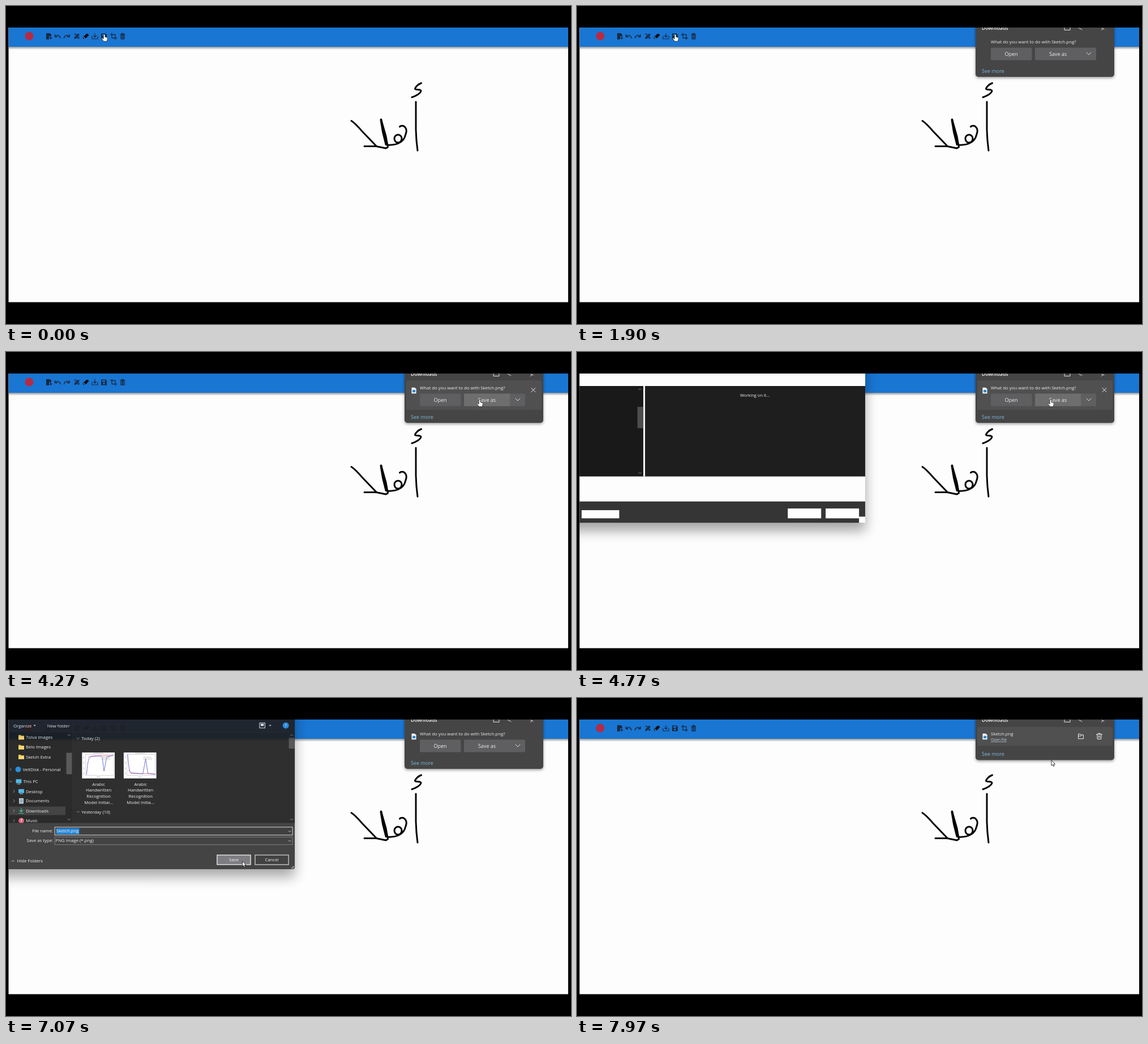
These frames come from a looping animation (998 px wide and 561 px high, 8 s). An HTML page:

```html
<!DOCTYPE html>
<html lang="en">
<head>
<meta charset="utf-8">
<title>Saving a sketch</title>
<style>
html, body { margin: 0; width: 100%; height: 100%; overflow: hidden; background: #000; }
svg { display: block; width: 100%; height: 100%; font-family: "Open Sans", "Noto Sans", sans-serif; }
.line { fill: none; stroke-linecap: round; stroke-linejoin: round; }
</style>
</head>
<body>
<svg id="stage" viewBox="0 0 998 561"></svg>
<script>
const LOOP = 8000;
const stage = document.getElementById("stage");

// Markup helpers
const rect = (x, y, w, h, fill, more = "") => `<rect x="${x}" y="${y}" width="${w}" height="${h}" fill="${fill}" ${more}/>`;
const line = (d, color, width = 1, more = "") => `<path class="line" d="${d}" stroke="${color}" stroke-width="${width}" ${more}/>`;
const label = (x, y, str, size = 7.8, fill = "#eee", more = "") => `<text x="${x}" y="${y}" font-size="${size}" fill="${fill}" ${more}>${str}</text>`;
const centred = (x, y, str, size = 7.8, fill = "#eee") => label(x, y, str, size, fill, 'text-anchor="middle"');
const group = (id, body, more = "") => `<g id="${id}" ${more}>${body}</g>`;
const at = (x, y, body) => `<g transform="translate(${x} ${y})">${body}</g>`;
const chevron = (x, y, dir, color = "#999", s = 2.2) => at(x, y,
  line({ right: `M${-s / 2} ${-s}L${s / 2} 0L${-s / 2} ${s}`,
         down: `M${-s} ${-s / 2}L0 ${s / 2}L${s} ${-s / 2}`,
         up: `M${-s} ${s / 2}L0 ${-s / 2}L${s} ${s / 2}` }[dir], color, 0.9));

function toolbar() {
  const ink = "#182a44";
  const icons = [
    [76, `<path d="M-5-5.5H1.5L4-3V0H0V5.5H-5Z" fill="${ink}"/>` + line("M1 3H5M3 1V5", ink, 1.3)],
    [91, line("M-4.5-3V1H-.5M-4 .5C-1-3.5 4-2 5 3", ink, 1.5)],
    [107.5, line("M4.5-3V1H.5M4 .5C1-3.5-4-2-5 3", ink, 1.5)],
    [125, line("M-4 4L4-4M-4 4L-3.5 1.5L2-4L4-2L-1.5 3.5ZM-4-3L-2.5-4.5L0-2M2 0L4.5 2.5L3 4L.5 1.5", ink, 1.1)],
    [141, `<path d="M-5.5 2L1-4.5H3.5L5.5-2L-1 4.5H-4Z" fill="#0a0d14"/>` + line("M-3.5 1.7L-1.5 3.7", "#5b9be0", 1.5)],
    [157, line("M0-5V1.5M-2.5-1L0 1.5L2.5-1M-5 0V4.5H5V0", ink, 1.2)],
    [173, `<path d="M-5-5H3L5-3V5H-5Z" fill="${ink}"/>` + rect(-3.2, -3.6, 5.6, 2.6, "#1976d2") + '<circle cy="2" r="1.7" fill="#1976d2"/>'],
    [190, line("M-3-5.5V3H5.5M-5.5-3H3V5.5", ink, 1.3)],
    [206, line("M-4-3.5H4M-1.3-5H1.3", ink, 1.4) + line("M-3-1.5V4.5H3V-1.5ZM-1 .3L1 2.7M1 .3L-1 2.7", ink, 1.3)]
  ];
  return rect(4.5, 72, 988.5, 5, "url(#barShade)") + rect(4.5, 38, 988.5, 34, "#1976d2") +
    '<circle cx="41" cy="53" r="7.5" fill="#b52b45"/>' +
    icons.map(([x, body]) => at(x, 53.5, body)).join("");
}

const sketch = () => line(
  "M733.5 136C728 138 723 143 722.5 146C723 149 733 146 733 150C732 154 724 159 717 161" +
  "M724 169L724 218L725 237L727 255" +
  "M610 202.5C617 207 623 214 629 221L654 247" +
  "M633 247.5L654 247.5L671 251L674.5 249L671 230L662.5 200" +
  "M674 245C689 246 700 241 704 232C707 224 709 218 705 214C702 210 697 211 695.5 213" +
  "M686 234A6.5 7 0 1 0 699 234A6.5 7 0 1 0 686 234", "#050505", 3) +
  line("M662.5 201L666 222L671.5 244", "#050505", 4);

function fileIcon() {
  return at(720.5, 68, '<path d="M-4-5.3H1.5L4-2.8V5.3H-4Z" fill="#f4f7fa"/>' + rect(-2.4, -1.2, 5, 4.4, "#2585d0", 'rx="1"'));
}

function popup() {
  const shell = h => rect(704, 10, 245, h - 10, "#454545", 'rx="5" filter="url(#soft)"') +
    label(715, 41.5, "Downloads", 8.7, "#f2f2f2", 'font-weight="600"') +
    line("M861 36V42.5H871V36M886 37.5A3 3 0 0 0 890 40L892 42M927 39L931 41M926.5 42.5L929 40.2", "#e2e2e2");
  const link = y => label(715, y, "See more", 9, "#7db9d8");
  return group("ask",
    shell(125) +
    group("row", rect(707, 50, 239, 52, "#505050", 'rx="3"')) +
    label(731, 65.7, "What do you want to do with Sketch.png?", 7.85) +
    rect(731, 73.5, 72.5, 22, "#5f5f61", 'rx="1.5"') + centred(767, 87.8, "Open", 9) +
    rect(809, 73.5, 108, 22, "#5f5f61", 'rx="1.5"') +
    group("lit", rect(809, 73.5, 81, 22, "#6e6e6e")) +
    centred(849.5, 87.8, "Save as", 9) + chevron(904, 84, "down", "#eee", 4) +
    group("icon", fileIcon()) +
    group("cross", line("M928 63.5L935 70.5M935 63.5L928 70.5", "#eee")) +
    link(117.8)) +
    group("done",
      shell(109.5) +
      group("doneRow", rect(707, 51, 239, 33.5, "#505050", 'rx="3"') +
        line("M885.5 71.5V63.5H889L890 65H894.5V71.5ZM885.5 67H890L891.5 65.5", "#eee") +
        line("M917.5 64H927.5M921 64V62.3H924V64M918.7 64L919.3 72.5H925.7L926.3 64M921.3 66.5V70M923.7 66.5V70", "#eee")) +
      fileIcon() + label(731, 65.8, "Sketch.png", 7.75) +
      label(731, 76.3, "Open file", 6.6, "#b5d3e5", 'text-decoration="underline"') +
      link(102.2));
}

function chart(x, blue, red) {
  return at(x, 96, rect(0, 0, 58, 46, "#fff") +
    rect(6, 3.5, 50, 37, "none", 'stroke="#aaa" stroke-width=".5"') +
    line(red, "#e8697a", 0.9) + line(blue, "#5656c8", 0.9) +
    line("M20 1.5H38M26 43.5H32M3 7V10M3 17V20M3 27V30M3 36V39", "#999", 0.7) +
    line("M35 8.5H49M35 11.5H50", "#aaa", 0.8));
}

function sidebar() {
  const folder = (x, y) => at(x, y, '<path d="M-5-4H-1L0-2.8H5V4H-5Z" fill="#e9b638"/>' + rect(-5, -1.8, 10, 5.8, "#ffd668", 'rx=".6"'));
  const monitor = (x, y) => at(x, y, rect(-5, -4, 10, 7, "#42b4e6", 'rx=".7"') + line("M-2.5 4.5H2.5", "#9fc6d8"));
  const sheet = (x, y) => at(x, y, rect(-4, -5, 8, 10, "#b9c8d4", 'rx=".7"') + line("M-2-2H2M-2 0H2M-2 2H2", "#4b6a85", 0.8));
  const arrow = (x, y) => at(x, y, line("M0-4.5V2M-3-1L0 2L3-1M-4 4.5H4", "#2fc08b", 1.2));
  const dot = color => (x, y) => `<circle cx="${x}" cy="${y}" r="5" fill="${color}"/>`;
  const music = (x, y) => dot("#dc5470")(x, y) + line(`M${x} ${y + 2}V${y - 3}L${x + 2} ${y - 2}`, "#fff");
  const items = [
    [69, 26, folder, "7olva Images"], [86.5, 26, folder, "Belo Images"], [104, 26, folder, "Sketch Extra"],
    [126, 20.5, dot("#1687d9"), "VeltDisk - Personal", "right", 7], [147.5, 21.5, monitor, "This PC", "down", 7],
    [165, 26, monitor, "Desktop", "right", 13], [182, 26, sheet, "Documents", "right", 13],
    [199.5, 26, arrow, "Downloads", "right", 13], [217, 26, music, "Music", "right", 13]
  ];
  return rect(4, 192, 100.5, 15, "#353535") + items.map(([y, x, icon, name, dir, cx]) =>
    icon(x, y) + label(x + 8, y + 2.8, name) + (dir ? chevron(cx, y, dir) : "")).join("");
}

function loadedDialog() {
  const button = (x, id, name, edge) => rect(x, 278, 59.5, 17, "#333", `id="${id}" stroke="${edge}" stroke-width="1.3"`) + centred(x + 29.7, 289, name);
  const caption = x => ["Arabic", "Handwritten", "Recognition", "Model Initia" + (x < 200 ? "l..." : "...")]
    .map((s, i) => centred(x, 154.8 + i * 10.8, s)).join("");
  return rect(-30, 10, 542, 50, "#202022") + rect(-30, 60, 147, 161, "#191919") + rect(117, 60, 395, 161, "#1e1e1e") +
    label(12, 51.3, "Organize") + '<path d="M47.5 47H52L49.8 49.5ZM466 47H470.5L468.3 49.5Z" fill="#ccc"/>' +
    label(72, 51.3, "New folder") +
    rect(449.5, 43.5, 9.5, 9, "none", 'stroke="#eee"') + rect(451.5, 45, 5.5, 4, "#eee") +
    '<circle cx="496" cy="48" r="5.5" fill="#2a8dde"/>' + centred(496, 51, "?", 8, "#fff") +
    `<g clip-path="url(#list)">${sidebar()}</g>` +
    [[111, 106, 96.5, 38], [506.5, 501.5, 70, 19]].map(([x, left, y, h]) =>
      chevron(x, 65, "up") + chevron(x, 215, "down") + rect(left, y, 10, h, "#4d4d4d")).join("") +
    chevron(127, 71, "down") + label(133, 73.6, "Today (2)") +
    chevron(127, 201.5, "down") + label(133, 204.2, "Yesterday (10)") +
    chart(134, "M8 39C10 18 11 8 17 7L33 6L36 9L39 33L44 8L55 5", "M11 8L20 6L55 5.5") +
    chart(208, "M7 4C9 22 9 33 13 36L34 38L39 11L43 37L56 39", "M9 31L13 37L56 38") +
    caption(163.5) + caption(238) +
    label(82.5, 238, "File name:", 7.8, "#eee", 'text-anchor="end"') +
    label(82.5, 255.3, "Save as type:", 7.8, "#eee", 'text-anchor="end"') +
    rect(85.5, 228.5, 422.5, 14, "#303030", 'stroke="#d5d5d5"') + rect(88, 230.5, 41, 10.5, "#1380d8") +
    rect(85.5, 246, 422.5, 13.5, "#343434", 'stroke="#777"') +
    label(88.5, 238, "Sketch.png") + label(87, 255.3, "PNG Image (*.png)") +
    chevron(503, 236, "down", "#ccc") + chevron(503, 253, "down", "#ccc") +
    chevron(11, 288.5, "up", "#ccc") + label(18.5, 291, "Hide Folders") +
    button(374, "saveButton", "Save", "#f2f2f2") + button(441.5, "cancelButton", "Cancel", "#ccc") +
    line("M506 301H510M508.5 298.5H510.5", "#bbb", 1.2);
}

function emptyDialog() {
  return rect(-30, 10, 542, 49.5, "#fdfdfd") + rect(-30, 59.5, 147, 161, "#191919") +
    rect(116.5, 59.5, 3.2, 161, "#fdfdfd") + rect(119.7, 59.5, 392.3, 161, "#1e1e1e") +
    rect(106, 96.5, 10.5, 38, "#4d4d4d") + chevron(110.5, 65, "up") + chevron(110.5, 214.5, "down") +
    label(288.8, 78.3, "Working on it...", 7.6) +
    rect(-30, 220.5, 542, 44.5, "#fdfdfd") +
    rect(6.5, 280.5, 67, 14.5, "#fdfdfd") + rect(374, 277.5, 59.5, 17.5, "#fdfdfd") +
    rect(441.5, 277.5, 59.5, 17.5, "#fdfdfd") + rect(501, 292, 11, 11, "#fdfdfd");
}

stage.innerHTML = `<defs>
  <linearGradient id="barShade" x2="0" y2="1"><stop stop-color="#000" stop-opacity=".4"/><stop offset="1" stop-color="#000" stop-opacity="0"/></linearGradient>
  <filter id="soft" x="-10%" y="-20%" width="120%" height="150%"><feDropShadow dx="0" dy="2" stdDeviation="2.5" flood-opacity=".4"/></filter>
  <filter id="deep" x="-10%" y="-10%" width="125%" height="135%"><feDropShadow dx="0" dy="14" stdDeviation="11" flood-opacity=".36"/></filter>
  <clipPath id="page">${rect(4.5, 38, 988.5, 484.5, "#fff")}</clipPath>
  <clipPath id="list">${rect(0, 60, 117, 161, "#fff")}</clipPath>
</defs>` + rect(0, 0, 998, 561, "#000") +
`<g clip-path="url(#page)">` + rect(4, 38, 990, 485, "#fdfdfd") + toolbar() + sketch() +
  group("popup", popup()) +
  group("dialog", rect(-30, 10, 542, 293, "#343434", 'rx="3" filter="url(#deep)"') +
    group("empty", emptyDialog()) + group("loaded", loadedDialog())) +
  group("hand", `<path d="M-1 0C0-1 1.3-.6 1.5 .6V4L4.8 5C6 5.4 6 6.2 5.8 7.4L4.8 11.8H-1L-4.4 7.2C-4.8 6-3.4 5.4-2.5 6.4L-1.3 7.5V.6Z" fill="#fff" stroke="#111" stroke-width=".7"/>`) +
  group("arrow", `<path d="M0 0V9.3L2.2 7.4L3.7 10.7L5.3 10L3.8 6.8L6.7 6.6Z" fill="#fff" stroke="#111" stroke-width=".8"/>`) +
`</g>`;

const parts = {};
stage.querySelectorAll("[id]").forEach(el => parts[el.id] = el);
const show = (id, on) => parts[id].setAttribute("visibility", on ? "inherit" : "hidden");
const ramp = (t, a, b) => Math.min(1, Math.max(0, (t - a) / (b - a)));
const ease = p => p * p * (3 - 2 * p);

// Pointer moves: start, end, x, y
const moves = [
  [0, 1, 173.5, 50.5],
  [2300, 3000, 836.5, 84.5],
  [4950, 5500, 418, 290],
  [6350, 6450, 417.5, 288],
  [7240, 7750, 838, 110]
];

function pointer(t) {
  let [, , x, y] = moves[0];
  for (const [a, b, tx, ty] of moves.slice(1)) {
    const p = ease(ramp(t, a, b));
    x += (tx - x) * p;
    y += (ty - y) * p;
  }
  return [x, y];
}

function render(t) {
  const saved = t >= 7300;
  const hover = t >= 2850 && t < 5050;
  show("popup", t >= 30);
  parts.popup.setAttribute("opacity", t < 100 ? 0.6 : 1);
  show("ask", !saved);
  show("done", saved);
  show("doneRow", t >= 7620);
  show("row", hover);
  show("cross", hover);
  show("lit", t >= 2950 && t < 5000);
  show("icon", t >= 2100);

  const opening = ramp(t, 4600, 4900);
  const closing = ramp(t, 7040, 7190) ** 1.6;
  const scale = 1 - 0.115 * (1 - opening) ** 3 - 0.075 * closing;
  show("dialog", opening > 0 && closing < 1);
  parts.dialog.setAttribute("opacity", Math.min(1, opening * 3) * (1 - closing));
  parts.dialog.setAttribute("transform", `translate(190 120) scale(${scale}) translate(-190 -120)`);
  show("empty", t < 4930);
  show("loaded", t >= 4930);
  parts.saveButton.setAttribute("fill", t >= 6400 ? "#747478" : "#333");

  const [x, y] = pointer(t);
  const hand = t < 2340 || (t >= 2950 && t < 4980);
  show("hand", hand);
  show("arrow", !hand);
  parts[hand ? "hand" : "arrow"].setAttribute("transform", `translate(${x} ${y})`);
}

function tick() {
  render(performance.now() % LOOP);
  requestAnimationFrame(tick);
}
tick();
</script>
</body>
</html>
```
